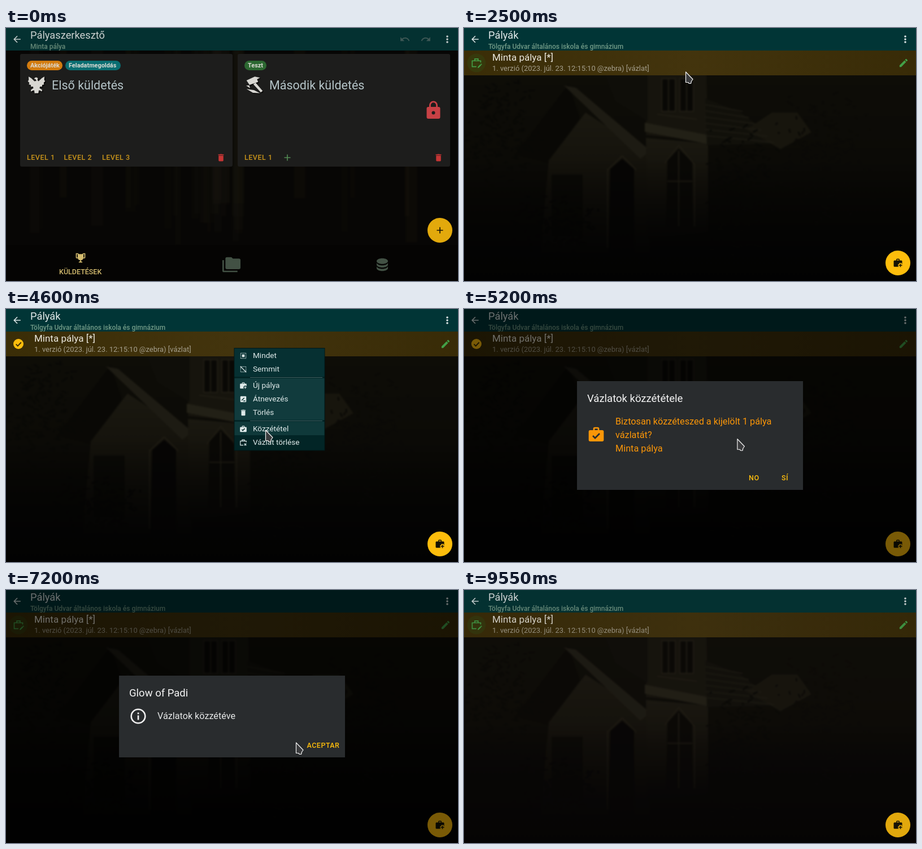
Recreate the animation shown at these times as an HTML page. Size 800x449 px, loop 9.6 s.

```html
<!DOCTYPE html>
<html lang="hu">
<head>
<meta charset="utf-8">
<style>
html, body { margin: 0; width: 100%; height: 100%; overflow: hidden; background: #000; }
svg { display: block; width: 100vw; height: 100vh; }
text { font-family: Roboto, "Open Sans", sans-serif; white-space: pre; }
.soft { filter: blur(1.5px); }
</style>
</head>
<body>
<svg id="stage" viewBox="0 0 800 449"></svg>
<script>
const AMBER = '#fdbd0c', GREEN = '#43a047', RED = '#dc3a3a', TEAL = '#013536';

const ICONS = {
  back: 'M20 11H7.83l5.59-5.59L12 4l-8 8 8 8 1.41-1.41L7.83 13H20z',
  undo: 'M12.5 8c-2.65 0-5.05.99-6.9 2.6L2 7v9h9l-3.62-3.62c1.39-1.16 3.16-1.88 5.12-1.88 3.54 0 6.55 2.31 7.6 5.5l2.37-.78C21.08 11.03 17.15 8 12.5 8z',
  lock: 'M18 8h-1V6A5 5 0 0 0 7 6v2H6a2 2 0 0 0-2 2v10a2 2 0 0 0 2 2h12a2 2 0 0 0 2-2V10a2 2 0 0 0-2-2zM12 17a2 2 0 1 1 0-4 2 2 0 0 1 0 4zM15.1 8H8.9V6a3.1 3.1 0 0 1 6.2 0z',
  trash: 'M6 19a2 2 0 0 0 2 2h8a2 2 0 0 0 2-2V7H6zM19 4h-3.5l-1-1h-5l-1 1H5v2h14z',
  pencil: 'M3 17.25V21h3.75L17.81 9.94l-3.75-3.75zM20.71 7.04a1 1 0 0 0 0-1.41l-2.34-2.34a1 1 0 0 0-1.41 0l-1.83 1.83 3.75 3.75z',
  data: 'M12 3C7.58 3 4 4.79 4 7s3.58 4 8 4 8-1.79 8-4-3.58-4-8-4M4 9v3c0 2.21 3.58 4 8 4s8-1.79 8-4V9c0 2.21-3.58 4-8 4S4 11.21 4 9m0 5v3c0 2.21 3.58 4 8 4s8-1.79 8-4v-3c0 2.21-3.58 4-8 4s-8-1.79-8-4z',
  folders: 'M22 4H14L12 2H6a2 2 0 0 0-2 2V16a2 2 0 0 0 2 2H22a2 2 0 0 0 2-2V6a2 2 0 0 0-2-2M2 6H0V20a2 2 0 0 0 2 2H20V20H2z',
  trophy: 'M18 2c-.9 0-2 1-2 2H8c0-1-1.1-2-2-2H2v9c0 1 1 2 2 2h2.2c.4 2 1.7 3.7 4.8 4v2.08C8 19.54 8 22 8 22h8s0-2.46-3-2.92V17c3.1-.3 4.4-2 4.8-4H20c1 0 2-1 2-2V2h-4M6 11H4V4h2v7m14 0h-2V4h2v7z',
  brief: 'M10 2h4a2 2 0 0 1 2 2v2h4a2 2 0 0 1 2 2v11a2 2 0 0 1-2 2H4a2 2 0 0 1-2-2V8a2 2 0 0 1 2-2h4V4a2 2 0 0 1 2-2m4 4V4h-4v2z',
  eagle: 'M12 6.5l-1.4-2.2-1.8-.2 1-1.6 2-.7 2 1.2-.4 2.8 1.3 1.4L19 3l3.5-2-.2 4.5 1.2 1.7-2 2 .6 2.2-2.5.6-.3 2.4-2.6-.2-.6 2.2 3.4 2.1-.3 2.3-2-1.2-2.1-.4L14.5 23h-5l-.6-3.8-2.1.4-2 1.2-.3-2.3 3.4-2.1-.6-2.2-2.6.2-.3-2.4-2.5-.6.6-2.2-2-2 1.2-1.7L1.5 1 5 3l4.3 4.2z',
  hammer: 'M2 6L13 1l7 1.5-4 2 1.5 3.5L6 12zM11 11l3.2-1.8L23.5 20 21 22zM1.500 13l4-.5 1.500 4zM2 17.500l10 1.500 8 4-9.500-.5z'
};

const rect = (x, y, w, h, fill, extra = '') =>
  `<rect x="${x}" y="${y}" width="${w}" height="${h}" fill="${fill}" ${extra}/>`;
const circle = (x, y, r, fill, extra = '') =>
  `<circle cx="${x}" cy="${y}" r="${r}" fill="${fill}" ${extra}/>`;
const line = (d, color, w = 2, extra = '') =>
  `<path d="${d}" fill="none" stroke="${color}" stroke-width="${w}" ${extra}/>`;
const poly = (points, fill) => `<polygon points="${points}" fill="${fill}"/>`;
const text = (x, y, size, fill, str, weight = 400, gap = 0) =>
  `<text x="${x}" y="${y}" font-size="${size}" fill="${fill}" font-weight="${weight}" letter-spacing="${gap}">${str}</text>`;
const button = (x, y, str, color = AMBER) => text(x, y, 12.5, color, str, 500, .5);
const place = (x, y, size, body) =>
  `<g transform="translate(${x - size / 2} ${y - size / 2}) scale(${size / 24})">${body}</g>`;
const icon = (name, x, y, size, color) =>
  place(x, y, size, `<path d="${ICONS[name]}" fill="${color}" fill-rule="evenodd"/>`);
const group = (id, body) => `<g id="${id}">${body}</g>`;

const check = (color, w = 2) => line('M7.5 13.5l3 3 6-6', color, w);
const briefcase = (x, y, size, color, mark) => icon('brief', x, y, size, color) + place(x, y, size, mark);
const openCase = color => line('M12 20H3V7.5H21V11M8.5 7V3.5h7V7', color);
const plus = (x, y, r, color, w) => line(`M${x - r} ${y}h${2 * r}M${x} ${y - r}v${2 * r}`, color, w);
const addMark = (color, back) => plus(18, 17.5, 5.5, back, 6) + plus(18, 17.5, 4, color, 2);

function random(seed) {
  return () => (seed = seed * 16807 % 2147483647) / 2147483647;
}

function header(title, sub, hover) {
  return rect(0, 0, 800, 40, TEAL) + hover + icon('back', 19.5, 20, 19, '#d9e4e4') +
    text(43, 19, 18.3, '#e3eaea', title) + text(43, 36.5, 12, '#719a87', sub, 500) +
    [15, 20, 25].map(y => circle(781, y, 1.8, '#dde6e6')).join('');
}

function forest() {
  const rnd = random(7);
  let out = rect(0, 0, 800, 449, '#050504');
  for (let i = 0; i < 34; i++) {
    const x = i < 22 ? 210 + rnd() * 210 : rnd() * 800;
    out += rect(x, 0, 4 + rnd() * 18, 300 + rnd() * 90, '#29261a', `opacity="${.04 + rnd() * .12}"`);
  }
  return `<g class="soft">${out}</g>` + rect(0, 385, 800, 64, '#000', 'opacity=".55"');
}

// dark leaves scattered around a point
function foliage(cx, cy, w, h, count, color) {
  const rnd = random(cx);
  let d = '';
  for (let i = 0; i < count; i++) {
    const x = cx + (rnd() + rnd() - 1) * w, y = cy + (rnd() + rnd() - 1) * h;
    d += `M${x.toFixed(1)} ${y.toFixed(1)}l${(rnd() * 24 - 12).toFixed(1)} ${(rnd() * 8).toFixed(1)}`;
  }
  return line(d, color, 3);
}

function house() {
  const trim = '#1f1c13', pane = '#090805';
  return `<g class="soft">` + rect(0, 0, 800, 449, 'url(#night)') +
    poly('90,225 185,100 205,160 150,240', '#090805') +
    poly('135,400 150,235 215,150 330,225 330,400', 'url(#wall)') +
    poly('177,102 198,106 330,218 312,232', '#1d1b13') +
    poly('325,0 427,0 432,200 322,190', '#16140d') +
    poly('250,84 325,84 325,165 268,130', '#0f0e09') +
    poly('322,195 432,205 432,362 325,375', 'url(#wall)') +
    poly('320,168 432,190 432,206 320,184', '#222016') +
    poly('427,125 490,150 560,205 430,208', '#11100a') +
    poly('500,180 545,150 590,150 615,185 560,215', '#17150d') +
    [136, 147, 158, 169, 180, 191].map(y => line(`M427 ${y}l${y - 70} 12`, '#1e1c14', 1.5)).join('') +
    [350, 382].map(x => rect(x, 90, 24, 58, pane, `stroke="${trim}" stroke-width="2"`)).join('') +
    line('M342 153L412 162M362 90V148M394 90V148', trim, 2) +
    poly('257,400 259,250 280,232 301,250 301,400', '#060504') +
    poly('358,355 360,235 380,214 404,238 404,352', pane) +
    line('M380 218V352M360 272H404M254 252L280 227 305 252M355 240L380 208 408 242M254 250V390M408 242V352', trim, 2) +
    rect(155, 260, 55, 110, '#070604', 'opacity=".7"') +
    foliage(490, 290, 65, 130, 200, '#080805') + foliage(640, 230, 90, 130, 160, '#0a0906') +
    foliage(70, 190, 80, 110, 160, '#080805') + foliage(170, 350, 90, 60, 120, '#060504') +
    rect(0, 230, 800, 219, 'url(#floor)') + '</g>';
}

const chip = (x, w, color, str) => rect(x, 58, w, 17, color, 'rx="8.5"') + text(x + 6, 70, 10.9, '#f4f4ee', str, 700);
function card(x, art, title, levels) {
  const shape = (dx, color) => icon(art, x + 29 + dx, 101 + dx, 32, color);
  return rect(x, 46, 376, 200, '#1d1f1f', 'rx="3"') + shape(1.5, '#000') + shape(0, '#f1f1ed') +
    text(x + 56, 108.7, 21.5, '#c9dbe0', title) +
    levels.map((dx, i) => button(x + dx, 234, 'LEVEL ' + (i + 1), '#e0a51c')).join('') +
    icon('trash', x + 355.5, 230, 17, RED);
}

const quests = forest() +
  header('Pályaszerkesztő', 'Minta pálya', circle(19, 20, 17, '#2c5354', 'id="backHover"')) +
  icon('undo', 706, 20, 19, '#42605f') +
  `<g transform="translate(1449 0) scale(-1 1)">${icon('undo', 706, 20, 19, '#42605f')}</g>` +
  card(25, 'eagle', 'Első küldetés', [12, 77.5, 145]) +
  chip(37, 63, '#ec8a10', 'Akciójáték') + chip(105, 98, '#087a80', 'Feladatmegoldás') +
  card(410, 'hammer', 'Második küldetés', [12]) + chip(422, 39, '#2f7436', 'Teszt') +
  plus(498, 230, 5.5, '#5b9c5e', 1.6) + icon('lock', 756.5, 146, 36, '#de474d') +
  circle(768, 359, 22, AMBER) + plus(768, 359, 5.5, '#161204', 1.7) +
  icon('trophy', 132, 408, 20, '#ecd27c') + text(94, 437, 12.5, '#ecd27c', 'KÜLDETÉSEK', 500) +
  icon('folders', 399, 420, 32, '#475a4c') + icon('data', 666, 420, 30, '#475a4c');

const maps = house() +
  header('Pályák', 'Tölgyfa Udvar általános iskola és gimnázium', '') +
  rect(0, 40, 800, 44, 'url(#row)') +
  group('plain', circle(22, 62, 16.5, '#37390c') +
    place(22, 62, 20, openCase(GREEN)) + icon('pencil', 28, 67, 10, GREEN)) +
  group('picked', circle(22, 62, 9, AMBER) + place(22, 62, 19, line('M6.5 12.5l4 4 7.5-8', '#3b2c06', 2.4))) +
  text(50, 58, 17, '#ece9df', 'Minta pálya [*]') +
  text(50, 76, 12.95, '#a59f8c', '1. verzió (2023. júl. 23. 12:15:10 @zebra) [vázlat]') +
  icon('pencil', 778, 62, 19, GREEN) +
  circle(768, 417, 22, AMBER) + briefcase(768, 417, 18, '#161204', addMark('#161204', AMBER));

const rows = [[82, 'Mindet'], [106, 'Semmit'], [135, 'Új pálya'], [159, 'Átnevezés'], [183, 'Törlés'],
  [212, 'Közzététel'], [236, 'Vázlat törlése']];
const pale = '#dfeaea', deep = '#0a3436';
const dotted = line('M4 4H20V20H4z', pale, 2, 'stroke-dasharray="2 2"');
const menu = rect(404, 69.5, 160, 181.5, '#022526', 'stroke="#011617"') +
  rect(404.5, 70, 159, 50, '#063032') + rect(404.5, 123, 159, 74, '#113b3d') +
  rect(404.5, 200, 159, 24, '#1b4a4c', 'id="menuHover" opacity=".55"') +
  [121.5, 198.5].map(y => line(`M432 ${y}H560`, '#426466', 1)).join('') +
  rows.map(([y, label]) => text(437, y + 4.8, 13.6, pale, label)).join('') +
  place(420, 83, 14, dotted + rect(8, 8, 8, 8, pale)) +
  place(420, 107, 14, dotted + line('M3 3L21 21', pale)) +
  briefcase(420, 136, 14, pale, addMark(pale, deep)) +
  place(420, 160, 14, rect(3, 3, 18, 18, pale, 'rx="2"') + line('M7 16l8-8M12 17h6', deep, 2.5)) +
  icon('trash', 420, 184, 14, pale) +
  briefcase(420, 213, 14, pale, check('#06292b', 2.5)) +
  place(420, 237, 14, openCase(pale) + line('M15 15l6 6m0-6l-6 6', pale));

const PANEL = '#292c2e', ORANGE = '#fb9608';
const ask = rect(200, 128, 400, 193, PANEL) +
  rect(544, 288, 52, 24, '#48494a', 'rx="2" id="yesHover"') +
  text(218, 165, 18.5, '#f4f4f4', 'Vázlatok közzététele') +
  briefcase(234, 223, 32, ORANGE, check(PANEL)) +
  ['Biztosan közzéteszed a kijelölt 1 pálya', 'vázlatát?', 'Minta pálya']
    .map((s, i) => text(268, 205 + 24 * i, 16.25, ORANGE, s)).join('') +
  button(504, 304, 'NO') + button(562, 304, 'SÍ');

const done = rect(200, 152, 400, 145, PANEL) +
  rect(527, 263, 70, 24, '#48494a', 'rx="2" id="okHover"') +
  text(218, 189, 18.5, '#f4f4f4', 'Glow of Padi') +
  circle(234, 224, 12.3, 'none', 'stroke="#f0f0f0" stroke-width="2.6"') +
  rect(232.7, 222.5, 2.7, 8, '#f0f0f0') + rect(232.7, 217.5, 2.7, 2.8, '#f0f0f0') +
  text(268, 229, 16.2, '#e6e8e8', 'Vázlatok közzétéve') + button(532.5, 280, 'ACEPTAR');

const gradient = (id, dir, ...colors) => `<linearGradient id="${id}" ${dir}>` +
  colors.map((c, i) => `<stop offset="${i / (colors.length - 1)}" stop-color="${c}"/>`).join('') + '</linearGradient>';
const down = 'x1="0" y1="0" x2="0" y2="1"';

stage.innerHTML = '<defs>' + gradient('night', down, '#0f0e08', '#0b0a06', '#030302') +
  gradient('wall', down, '#1a1810', '#12100a', '#080705') +
  gradient('floor', down, '#02020200', '#020202f0') +
  gradient('row', '', '#3a2d07', '#43340d', '#382b07') + '</defs>' +
  group('quests', quests) + group('maps', maps) + group('menu', menu) +
  rect(0, 0, 800, 449, '#000', 'id="dim"') + group('ask', ask) + group('done', done) +
  `<path id="cursor" d="M.5 0V18.500H4.500L6.500 20.500H9.500L10.500 16.500 13 13z" fill="#3b3c3e" stroke="#f2f2f2" stroke-width="1.2" stroke-linejoin="round"/>` +
  rect(0, 0, 800, 449, '#1a1710', 'id="veil"');

const el = id => document.getElementById(id);
const show = (id, a) => {
  el(id).setAttribute('opacity', a);
  el(id).style.visibility = a > 0 ? 'visible' : 'hidden';
};
const clamp = v => Math.min(1, Math.max(0, v));
const ease = v => v * v * (3 - 2 * v);
const ramp = (t, from, to) => ease(clamp((t - from) / (to - from)));
const pulse = (t, a, b, c, d) => ramp(t, a, b) - ramp(t, c, d);
const pop = (id, a, x, y) => {
  const s = .9 + .1 * a;
  show(id, a);
  el(id).setAttribute('transform', `translate(${x * (1 - s)} ${y * (1 - s)}) scale(${s})`);
};

// time, x, y of the pointer tip
const track = [[300, 230, 300], [1250, 13.5, 36], [1750, 13.5, 36], [2500, 392, 78], [2800, 404, 70],
  [3850, 404, 70], [4600, 459, 215], [4950, 459, 215], [5800, 575, 290], [6300, 567, 302],
  [6700, 567, 302], [7200, 513, 271], [7600, 553, 272]];
function pointer(t) {
  const i = track.findIndex(k => k[0] > t);
  if (i < 0) return track[track.length - 1].slice(1);
  if (i === 0) return track[0].slice(1);
  const [t0, x0, y0] = track[i - 1], [t1, x1, y1] = track[i], p = ramp(t, t0, t1);
  return [x0 + (x1 - x0) * p, y0 + (y1 - y0) * p];
}

function draw(t) {
  const [x, y] = pointer(t);
  const inside = (l, top, r, b) => +(x >= l && x <= r && y >= top && y <= b);
  const page = ramp(t, 1750, 2050);
  show('quests', +(page < 1));
  show('maps', page);
  show('backHover', page < 1 ? inside(2, 3, 36, 40) : 0);

  const picked = t >= 3050 && t < 6750;
  show('plain', picked ? 0 : page);
  show('picked', +picked);

  const menuAlpha = pulse(t, 3750, 3950, 4850, 5000);
  pop('menu', menuAlpha, 404, 70);
  const row = rows.find(r => Math.abs(r[0] - y) <= 12);
  show('menuHover', row && menuAlpha && x > 404 ? .55 : 0);
  if (row) el('menuHover').setAttribute('y', row[0] - 12);

  const asking = pulse(t, 4950, 5150, 6650, 6800), told = pulse(t, 6850, 7050, 8550, 8800);
  pop('ask', asking, 400, 224.5);
  pop('done', told, 400, 224.5);
  show('dim', .52 * Math.max(asking, told));
  show('yesHover', asking ? inside(544, 288, 596, 312) : 0);
  show('okHover', told ? inside(527, 263, 597, 287) : 0);

  show('cursor', +(t >= 300 && t < 9350));
  el('cursor').setAttribute('transform', `translate(${x} ${y})`);
  show('veil', .12 * Math.max(clamp(1 - t / 250), clamp((t - 9350) / 200)));
}

const start = performance.now();
function tick() {
  draw((performance.now() - start) % 9600);
  requestAnimationFrame(tick);
}
tick();
</script>
</body>
</html>
```
